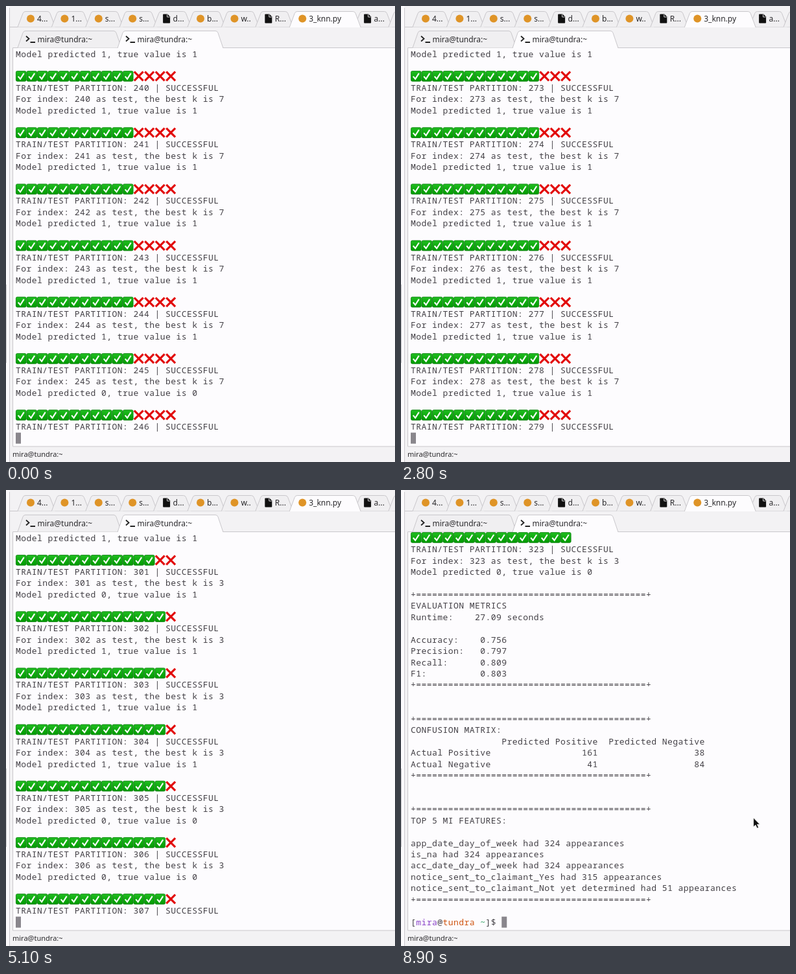
Animation, 600 px wide and 704 px high, one loop 9000 ms. Source, as an HTML page:

```html
<!DOCTYPE html>
<html lang="en">
<head>
<meta charset="utf-8">
<title>Terminal run</title>
<style>
html, body { margin: 0; width: 100%; height: 100%; overflow: hidden; background: #f3f2f4; }
svg { display: block; }
text { font: 12px "Noto Sans", sans-serif; fill: #29282b; white-space: pre; }
#screen text { font: 13px "Noto Sans Mono", monospace; letter-spacing: .45px; fill: #434046; }
#screen .name { fill: #8b45c9; }
#screen .host { fill: #cf5410; }
#screen .dir { fill: #1c9a55; }
</style>
</head>
<body>
<svg width="600" height="704" viewBox="0 0 600 704">
  <defs>
    <linearGradient id="green" x2="0" y2="1">
      <stop stop-color="#20bd20"/><stop offset="1" stop-color="#009a00"/>
    </linearGradient>
    <g id="yes">
      <rect x=".4" y=".3" width="15.7" height="15.7" rx="2" fill="url(#green)" stroke="#087c0c" stroke-width=".8"/>
      <path d="M3.7 8.5l3.4 4L12.7 3.7" fill="none" stroke="#fff" stroke-width="2.1"/>
    </g>
    <path id="no" d="M1.3 1.3l13.8 13.8m0-13.8L1.3 15.1" stroke="#e20a0a" stroke-width="3.2"/>
    <g id="doc">
      <path d="M-4.5-7h6l4 4v9q0 1-1 1h-9q-1 0-1-1v-12q0-1 1-1z" fill="#111"/>
      <path d="M1-6.5v4h4" fill="none" stroke="#f0eff1" stroke-width=".9"/>
    </g>
    <path id="shell" d="M0-5l4.5 4-4.5 4M6.5 4.5h7.5" fill="none" stroke="#222" stroke-width="1.8"/>
  </defs>
  <path d="M0 0h5v704H0z" fill="#fbfafc"/>
  <path d="M5.5 3v701M.5 430v121" stroke="#cbc9cd"/>
  <g id="chrome"></g>
  <g id="screen"></g>
  <path id="mouse" d="M543.6 506v14.2l3.3-3 2.3 5 2.4-1-2.2-4.9h4.2z" fill="#111" stroke="#fff" stroke-width=".8"/>
</svg>
<script>
const $ = id => document.getElementById(id);
const LOOP = 9000, STEP = 100, ROWS = 34, ROW_H = 17.44, CELL = 8.25, LEFT = 15, TOP = 65.3;
const NAME = 'mira', HOST = 'tundra', TITLE = `${NAME}@${HOST}:~`;
const PAPER = '#fdfcfe';

const label = (x, y, s, style = '') => `<text x="${x}" y="${y}" style="${style}">${s}</text>`;
const use = (id, x, y) => `<use href="#${id}" x="${x}" y="${y}"/>`;
const line = d => `<path d="${d}" fill="none" stroke="#c9c7cb"/>`;
const tab = (x, right, top, base, fill) =>
  `<path d="M${x} ${base}L${x + 8} ${top + 3}q1-3 4-3H${right - 12}q3 0 4 3L${right} ${base}" fill="${fill}" stroke="#c9c7cb"/>`;

function drawChrome() {
  const titles = ['4...', '1...', 's...', 's...', 'd...', 'b...', 'w..', 'R...', '3_knn.py', 'a...', ''];
  const active = 8;
  let out = line('M6 32.5H600');
  const fileTab = i => {
    const x = 18 + 52.4 * i + (i > active ? 48 : 0), on = i === active;
    out += tab(x, x + (on ? 110 : 58), 8.5, on ? 33 : 32.5, on ? PAPER : '#f0eff1');
    if (!titles[i]) return;
    out += [4, 7, 9].includes(i) ? use('doc', x + 20, 19.5)
      : `<circle cx="${x + 20}" cy="19.5" r="6" fill="#df9427"/>`;
    out += label(x + 30, 24, titles[i]);
  };
  titles.forEach((_, i) => i !== active && fileTab(i));
  fileTab(active);
  out += `<path d="M10.5 64.5H600V680H10.5z" fill="${PAPER}"/>` + line('M600 64.5H10.5V680H600');
  out += tab(18, 178, 38.5, 64.5, '#f0eff1') + tab(172, 335, 38.5, 65, PAPER);
  for (const x of [31, 185]) out += use('shell', x, 51.5) + label(x + 17.5, 56, TITLE);
  $('chrome').innerHTML = out + label(10, 696, TITLE, 'font-size:11px');
}

// Outcome of one partition: [predicted, true]
function outcome(i) {
  if ([253, 292, 293].includes(i)) return [1, 0];
  if ([255, 301].includes(i)) return [0, 1];
  const zero = [245, 294, 295].includes(i) || (i >= 305 && i !== 317);
  return zero ? [0, 0] : [1, 1];
}

const FIRST = 239, TOTAL = 324;
const log = [];
for (let i = FIRST; i < TOTAL; i++) {
  const [guess, truth] = outcome(i);
  log.push(Math.floor((i + 1) * 15 / TOTAL),
    `TRAIN/TEST PARTITION: ${i} | SUCCESSFUL`,
    `For index: ${i} as test, the best k is ${i < 292 ? 7 : 3}`,
    `Model predicted ${guess}, true value is ${truth}`, '');
}
const rule = `+${'='.repeat(43)}+`;
const metric = (name, value) => name.padEnd(13) + value;
const matrixRow = (name, a, b) => name.padEnd(15) + String(a).padStart(20) + String(b).padStart(20);
log.push(rule, 'EVALUATION METRICS', 'Runtime:    27.09 seconds', '',
  metric('Accuracy:', '0.756'), metric('Precision:', '0.797'),
  metric('Recall:', '0.809'), metric('F1:', '0.803'), rule, '', '',
  rule, 'CONFUSION MATRIX:', matrixRow('', 'Predicted Positive', 'Predicted Negative'),
  matrixRow('Actual Positive', 161, 38), matrixRow('Actual Negative', 41, 84), rule, '', '',
  rule, 'TOP 5 MI FEATURES:', '');
for (const [feature, n] of [['app_date_day_of_week', 324], ['is_na', 324], ['acc_date_day_of_week', 324],
  ['notice_sent_to_claimant_Yes', 315], ['notice_sent_to_claimant_Not yet determined', 51]])
  log.push(`${feature} had ${n} appearances`);
log.push(rule, '');

// Time in ms against partitions processed
const pace = [[0, 246.3], [1200, 260.3], [2800, 279.3], [4300, 297.95], [5100, 307.3], [6400, 323.3], [6500, 324]];
function progress(t) {
  const k = pace.findIndex(([end]) => t < end);
  if (k < 0) return TOTAL;
  const [t0, p0] = pace[k - 1], [t1, p1] = pace[k];
  return p0 + (p1 - p0) * (t - t0) / (t1 - t0);
}

function linesShown(t) {
  const p = progress(t), i = Math.floor(p);
  return i >= TOTAL ? log.length : (i - FIRST) * 5 + (p - i > .9 ? 3 : 2);
}

function drawRow(content, r) {
  const y = TOP + r * ROW_H;
  if (typeof content === 'string') return label(LEFT, y + 13.4, content);
  return Array.from({ length: 15 }, (_, k) =>
    use(k < content ? 'yes' : 'no', LEFT + k * 2 * CELL, y)).join('');
}

const prompt = `[<tspan class="name">${NAME}</tspan>@<tspan class="host">${HOST}</tspan> <tspan class="dir">~</tspan>]$`;
function drawScreen(t) {
  const n = linesShown(t), done = t >= 6600;
  let out = log.slice(n - ROWS, n).map(drawRow).join('');
  if (done) out += drawRow(prompt, ROWS);
  const col = done ? NAME.length + HOST.length + 7 : 0;
  out += `<rect x="${LEFT + col * CELL}" y="${TOP + ROWS * ROW_H + .4}" width="8" height="17" fill="#89868c"/>`;
  $('screen').innerHTML = out;
  $('mouse').style.display = t >= 8500 ? '' : 'none';
}

let last = -1;
function tick() {
  const t = Math.floor(performance.now() % LOOP / STEP) * STEP;
  if (t !== last) drawScreen(last = t);
  requestAnimationFrame(tick);
}
drawChrome();
tick();
</script>
</body>
</html>
```
